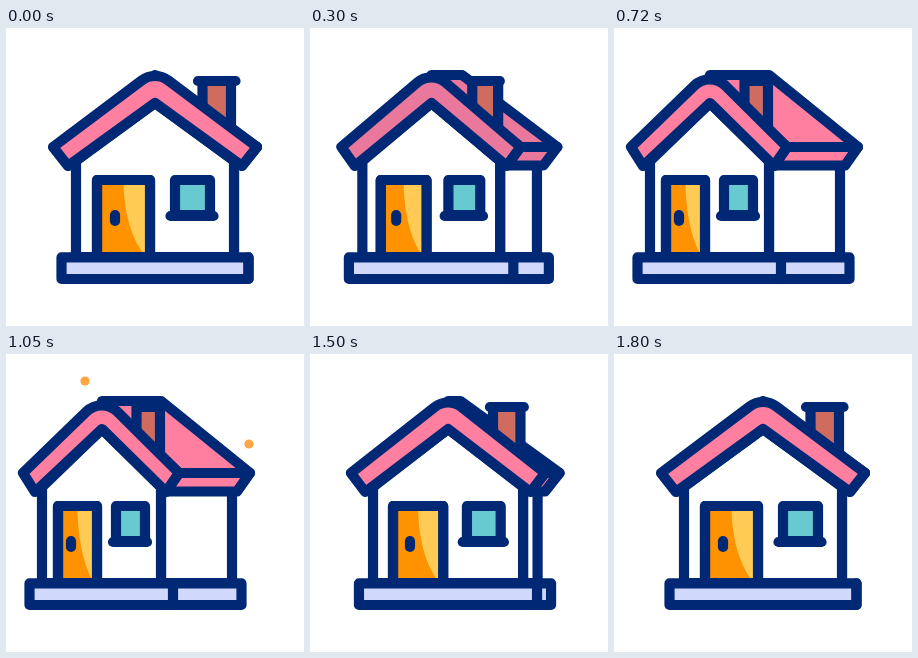
An HTML page with a canvas that plays this animation: 298 px wide and 298 px high, repeating every 2.25 s.

```html
<!DOCTYPE html>
<html lang="en">
<head>
<meta charset="utf-8">
<title>Turning house</title>
<style>
  html, body { margin: 0; width: 100%; height: 100%; overflow: hidden; background: #fff; }
  canvas { display: block; width: 298px; height: 298px; }
</style>
</head>
<body>
<canvas id="stage"></canvas>
<script>
const SIZE = 298, LOOP = 2250, STEP = 30;
const INK = '#002874', LINE = 10.2;
const canvas = document.getElementById('stage');
const ctx = canvas.getContext('2d');
const ratio = window.devicePixelRatio || 1;
canvas.width = canvas.height = Math.round(SIZE * ratio);

const clamp = v => Math.min(1, Math.max(0, v));
const mix = (a, b, k) => a + (b - a) * k;

// Gentle start, long settling end: cubic-bezier(.55, 0, .25, 1).
function ease(x) {
  x = clamp(x);
  let lo = 0, hi = 1;
  for (let i = 0; i < 24; i++) {
    const s = (lo + hi) / 2, r = 1 - s;
    if (1.65 * r * r * s + 0.75 * r * s * s + s * s * s < x) lo = s;
    else hi = s;
  }
  return lo * lo * (3 - 2 * lo);
}

function turnAt(t) {
  return t < 1110 ? ease(t / 695) : 1 - ease((t - 1110) / 690);
}

function paint(fill, stroke = true) {
  if (fill) { ctx.fillStyle = fill; ctx.fill(); }
  if (stroke) ctx.stroke();
}

function poly(points, fill, stroke) {
  ctx.beginPath();
  points.forEach(([x, y]) => ctx.lineTo(x, y));
  ctx.closePath();
  paint(fill, stroke);
}

function box(x1, y1, x2, y2, fill) {
  poly([[x1, y1], [x2, y1], [x2, y2], [x1, y2]], fill);
}

function line(x1, y1, x2, y2) {
  ctx.beginPath();
  ctx.moveTo(x1, y1);
  ctx.lineTo(x2, y2);
  ctx.stroke();
}

function drawDoor(left, right, knob) {
  const at = k => mix(left, right, k);
  box(left, 152, right, 229, '#ff9200');
  ctx.beginPath();
  ctx.moveTo(at(.5), 152);
  ctx.bezierCurveTo(at(.5), 182, at(.64), 212, at(.93), 229);
  ctx.lineTo(right, 229);
  ctx.lineTo(right, 152);
  ctx.closePath();
  paint('#ffcb55', false);
  box(left, 152, right, 229);
  line(knob, 187, knob, 193);
}

function drawHouse(p) {
  const x = (front, turned) => mix(front, turned, p);
  const shade = Math.sin(Math.PI * p) ** 6;
  const pink = `rgb(${255 - 22 * shade}, ${127 - 7 * shade}, ${160 - 4 * shade})`;
  const apex = x(149, 96);
  const wallL = x(70, 36), wallM = x(228, 155), wallR = x(228, 226);
  const tipL = x(47, 17), footL = x(62, 29);
  const tipM = x(251, 173), footM = x(236, 160);
  const tipR = x(251, 244), footR = x(236, 231);

  ctx.lineWidth = LINE;
  ctx.lineCap = ctx.lineJoin = 'round';
  ctx.strokeStyle = INK;

  // Side wall and side roof
  box(wallM, 130, wallR, 229, '#fff');
  poly([[apex, 47], [x(149, 155), 47], [tipR, 119], [tipM, 119]], pink);
  poly([[tipM, 119], [tipR, 119], [footR, 137.5], [footM, 137.5]], pink);

  // Chimney
  box(x(196.5, 130.5), 53, x(225, 154), 112, '#cf6c5f');
  line(x(192, 133), 53, x(229.5, 153), 53);

  // Front wall
  poly([[wallL, 229], [wallL, 133], [apex, 75], [wallM, 133], [wallM, 229]], '#fff');

  // Gable
  ctx.beginPath();
  ctx.moveTo(tipL, 119);
  ctx.arcTo(apex, 42.5, tipM, 119, 22);
  ctx.lineTo(tipM, 119);
  ctx.lineTo(footM, 138);
  ctx.lineTo(apex, 75);
  ctx.lineTo(footL, 138);
  ctx.closePath();
  paint(pink);

  drawDoor(x(91, 52), x(144, 91), x(109, 65));

  // Window
  box(x(169, 110), 152, x(204, 139), 187, '#66cad0');
  line(x(164.5, 107), 188, x(207.5, 141), 188);

  // Base
  box(x(55.5, 23.5), 229.3, x(242.5, 235.5), 251, '#d0d9fc');
  const seam = x(242.5, 167);
  line(seam, 229.3, seam, 251);
}

function drawSpark(cx, cy, size) {
  if (size <= 0) return;
  ctx.beginPath();
  ctx.arc(cx, cy, 4.6 * size, 0, 2 * Math.PI);
  paint('#ffa544', false);
}

function drawSparks(t) {
  const size = ease((t - 720) / 180) * (1 - ease((t - 1260) / 180));
  drawSpark(79, 27, size);
  drawSpark(243, 90, size);
}

function frame(now) {
  const t = Math.floor((now % LOOP) / STEP) * STEP;
  ctx.setTransform(ratio, 0, 0, ratio, 0, 0);
  ctx.fillStyle = '#fff';
  ctx.fillRect(0, 0, SIZE, SIZE);
  drawHouse(turnAt(t));
  drawSparks(t);
}

let start;
function tick(now) {
  if (start === undefined) start = now;
  frame(now - start);
  requestAnimationFrame(tick);
}
frame(0);
requestAnimationFrame(tick);
</script>
</body>
</html>
```
